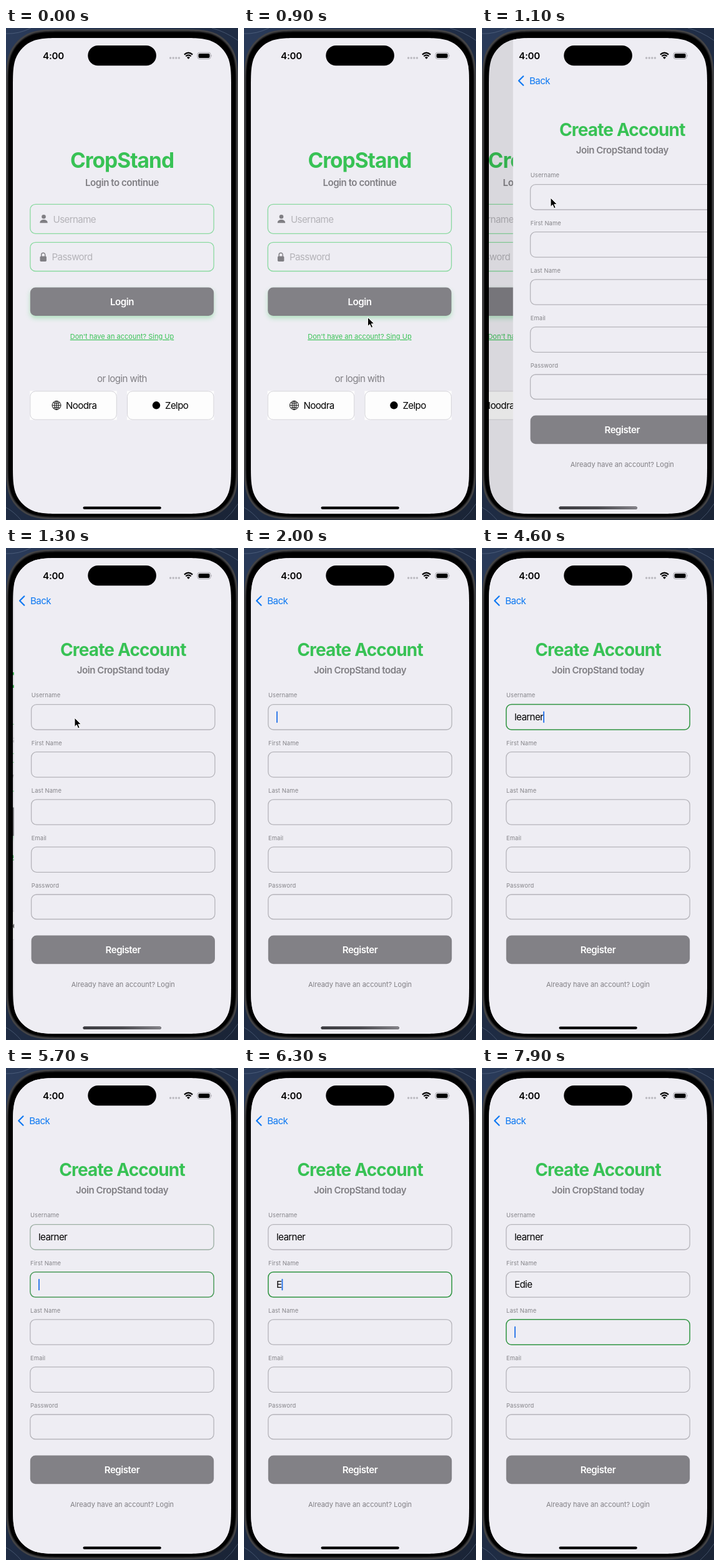
Recreate the animation shown at these times as an HTML page. Size 372x788 px, loop 8000 ms.

```html
<!DOCTYPE html>
<html lang="en">
<head>
<meta charset="utf-8">
<title>Sign up flow</title>
<style>
  html, body { margin: 0; width: 100%; height: 100%; overflow: hidden; background: #1b263a; }
  svg { display: block; width: 372px; height: 788px; }
  text {
    font-family: Inter, "Liberation Sans", sans-serif;
    font-optical-sizing: none;
    font-size: 15.1px;
    letter-spacing: -.04em;
    white-space: pre;
  }
  .mid { text-anchor: middle; }
  .title { font-weight: 700; font-size: 28px; letter-spacing: -.03em; fill: #38c255; }
  .brand { font-size: 33.5px; }
  .semi { font-weight: 600; letter-spacing: -.032em; }
  .small { font-size: 11px; letter-spacing: 0; }
  .label { font-size: 9.4px; letter-spacing: .012em; fill: #858489; }
  .grey { fill: #807f84; }
  .hint { fill: #b4b3b8; }
  .green { fill: #38c255; }
  .blue { fill: #0d78f2; }
  .white { fill: #fff; }
  .link { text-decoration: underline; }
  .page { fill: #eeedf3; }
  .button { fill: #828186; }
  .box { fill: none; stroke: #8ad9a0; stroke-width: 1.3; }
</style>
</head>
<body>
<svg viewBox="0 0 372 788" xmlns="http://www.w3.org/2000/svg">
  <defs>
    <linearGradient id="wall" x1="0" y1="0" x2="1" y2="1">
      <stop offset="0" stop-color="#2a3b5a"/>
      <stop offset=".5" stop-color="#1f2c44"/>
      <stop offset="1" stop-color="#1a2436"/>
    </linearGradient>
    <linearGradient id="bar">
      <stop offset="0" stop-color="#3c3c41"/>
      <stop offset=".5" stop-color="#4a4a4f"/>
      <stop offset="1" stop-color="#85848a"/>
    </linearGradient>
    <clipPath id="screen"><path id="glass"/></clipPath>
    <filter id="glow" x="-10%" y="-50%" width="120%" height="220%">
      <feDropShadow dx="0" dy="4" stdDeviation="3.5" flood-color="#34c759" flood-opacity=".32"/>
    </filter>
  </defs>

  <rect width="372" height="788" fill="url(#wall)"/>
  <g fill="none" stroke="#6b7c98" stroke-opacity=".5">
    <path d="M0 9Q20 10 40 0M330 0Q352 6 372 20M0 768Q12 774 24 788M350 788Q362 778 372 762"/>
  </g>
  <path id="rim" fill="#434345"/>
  <path id="edge" fill="#1f1f21"/>
  <path id="bezel"/>

  <g clip-path="url(#screen)">
    <g id="login">
      <rect class="page" x="11" y="16" width="350" height="762"/>
      <text class="title brand mid" x="186" y="224">CropStand</text>
      <text class="semi grey mid" x="186" y="252.5">Login to continue</text>

      <rect class="box" x="38.8" y="282.3" width="294.4" height="47" rx="8.5"/>
      <g class="grey">
        <circle cx="60.5" cy="302.3" r="3.3"/>
        <path d="M54.3 312.3C54.3 308.5 57 307 60.5 307S66.7 308.5 66.7 312.3Z"/>
      </g>
      <text class="hint" x="75.5" y="311.5">Username</text>

      <rect class="box" x="38.8" y="343.3" width="294.4" height="46.2" rx="8.5"/>
      <rect class="grey" x="54.5" y="365.5" width="10.4" height="8.4" rx="1.6"/>
      <path d="M56.7 366V363.2A3 3 0 0 1 62.7 363.2V366" fill="none" stroke="#807f84" stroke-width="1.4"/>
      <text class="hint" x="73.5" y="372">Password</text>

      <rect class="button" x="38.8" y="415.5" width="294.4" height="45.5" rx="8.5" filter="url(#glow)"/>
      <text class="semi white mid" x="186" y="444">Login</text>
      <text class="small green link mid" x="186" y="498">Don't have an account? Sing Up</text>
      <text class="grey mid" x="186" y="567">or login with</text>

      <g fill="#fdfdfd">
        <rect x="38.3" y="581.3" width="139.4" height="46.4"/>
        <rect x="194" y="581.3" width="139.4" height="46.4"/>
      </g>
      <g fill="none" stroke="#d3d2d8">
        <rect x="38.8" y="581.8" width="138.5" height="45.4" rx="8.5"/>
        <rect x="194.5" y="581.8" width="138.5" height="45.4" rx="8.5"/>
      </g>
      <g fill="none" stroke="#111" stroke-width="1">
        <circle cx="81" cy="604.3" r="7"/>
        <ellipse cx="81" cy="604.3" rx="3.3" ry="7"/>
        <path d="M74 604.3H88M81 597.3V611.3M75.6 600.2Q81 602.4 86.4 600.2M75.6 608.4Q81 606.2 86.4 608.4"/>
      </g>
      <text x="96" y="609.7">Noodra</text>
      <circle cx="241" cy="604.3" r="6.2"/>
      <text x="255" y="609.7">Zelpo</text>
      <rect id="dim" x="11" y="16" width="350" height="762"/>
    </g>

    <g id="signup">
      <rect class="page" x="11" y="16" width="350" height="762"/>
      <path d="M27.5 77.3L20.2 84.5L27.5 91.7" fill="none" stroke="#0d78f2" stroke-width="2.2" stroke-linecap="round" stroke-linejoin="round"/>
      <text class="blue" x="37.3" y="90">Back</text>
      <text class="title mid" x="186" y="172.5">Create Account</text>
      <text class="semi grey mid" x="186" y="200.5">Join CropStand today</text>
      <g id="form"></g>
      <rect id="caret" width="1.8" height="18.5" rx=".8" fill="#1f6fe8"/>
      <rect class="button" x="38.8" y="620.5" width="294.4" height="45.7" rx="8.5"/>
      <text class="semi white mid" x="186" y="649">Register</text>
      <text class="small grey mid" x="186" y="703">Already have an account? Login</text>
    </g>

    <text class="semi" x="59" y="50" style="letter-spacing:-.01em">4:00</text>
    <g fill="#b9b8be">
      <circle cx="263.6" cy="48" r="1.7"/><circle cx="268.2" cy="48" r="1.7"/>
      <circle cx="272.8" cy="48" r="1.7"/><circle cx="277.4" cy="48" r="1.7"/>
    </g>
    <g fill="none" stroke="#000" stroke-width="2.1">
      <path d="M285.9 42.6Q292.5 36.6 299.1 42.6M288.3 45.2Q292.5 41.5 296.7 45.2"/>
    </g>
    <path d="M290 47.2Q292.5 45 295 47.2L292.5 49.8Z"/>
    <rect x="307" y="39.3" width="21.2" height="10.2" rx="3.2" fill="none" stroke="#a3a2a8"/>
    <rect x="308.6" y="40.9" width="18" height="7" rx="1.9"/>
    <path d="M329.4 42.8Q331 44.4 329.4 46Z" fill="#a3a2a8"/>
  </g>

  <rect x="131.3" y="28" width="109.6" height="32.3" rx="16.1"/>
  <rect x="123.5" y="766.4" width="125.3" height="4.4" rx="2.2"/>
  <rect id="shine" x="123.5" y="766.4" width="125.3" height="4.4" rx="2.2" fill="url(#bar)"/>
  <path id="pointer" d="M0 0V14.4L3.3 11.3L5.6 16.8L8.1 15.7L5.8 10.4H10.4Z" stroke="#fff" stroke-width="1"/>
</svg>

<script>
const LOOP = 8000;
const PUSH = 895;
const WIDTH = 350;
const ROW = 76.1;
const IDLE = [181, 180, 186];
const ACTIVE = [47, 148, 64];

const labels = ["Username", "First Name", "Last Name", "Email", "Password"];
const values = ["learner", "Edie", "", "", ""];

// [time, field, characters typed]
const keys = [
  [1960, 0, 0], [2700, 0, 1], [2950, 0, 2], [3200, 0, 3], [3500, 0, 4],
  [3750, 0, 5], [4000, 0, 6], [4250, 0, 7],
  [5500, 1, 0], [6150, 1, 1], [6500, 1, 2], [6750, 1, 3], [7000, 1, 4],
  [7650, 2, 0]
];

// [time, x, y]
const trail = [[300, 225, 520], [600, 214, 497], [840, 214, 497], [1090, 110, 272], [1900, 110, 272]];

const $ = id => document.getElementById(id);
const clamp = v => Math.min(1, Math.max(0, v));
const ease = p => p * p * (3 - 2 * p);
const mix = (a, b, p) => a + (b - a) * p;

// Rounded box whose corners flow smoothly into the straight sides
function smoothBox(id, x, y, w, h, r) {
  const bend = [[0, 1.529], [0, 1.088], [0, .868], [.075, .631], [.169, .373], [.373, .169], [.631, .075], [.868, 0], [1.088, 0], [1.529, 0]];
  const corner = (right, bottom) => {
    const points = bend.map(([a, b]) => [
      right ? x + w - a * r : x + a * r,
      bottom ? y + h - b * r : y + b * r
    ]);
    if (right !== bottom) points.reverse();
    const [first, ...rest] = points;
    return `${first}C${rest}`;
  };
  $(id).setAttribute("d", `M${corner(false, false)}L${corner(true, false)}L${corner(true, true)}L${corner(false, true)}Z`);
}

function add(tag, attrs, text = "") {
  const el = document.createElementNS("http://www.w3.org/2000/svg", tag);
  for (const name in attrs) el.setAttribute(name, attrs[name]);
  el.textContent = text;
  return $("form").appendChild(el);
}

smoothBox("rim", 0, 2, 372, 785, 64);
smoothBox("edge", 2.5, 4.5, 367, 780, 62);
smoothBox("bezel", 4, 6.5, 364, 776, 60);
smoothBox("glass", 11, 16, 350, 762, 54);

const fields = labels.map((label, i) => {
  const y = 250.6 + i * ROW;
  add("text", { class: "label", x: 39, y: y - 11.2 }, label);
  return {
    y,
    box: add("rect", { x: 38.8, y, width: 294.4, height: i < 4 ? 40.4 : 39.5, rx: 8.5, fill: "none" }),
    text: add("text", { x: 52, y: y + 25.6 })
  };
});

function slide(t) {
  const s = Math.max(0, t - PUSH) * 0.01826;
  const p = s > 11 ? 1 : 1 - (1 + s) * Math.exp(-s);
  $("signup").setAttribute("transform", `translate(${WIDTH * (1 - p)} 0)`);
  $("login").setAttribute("transform", `translate(${-0.3 * WIDTH * p} 0)`);
  $("dim").setAttribute("opacity", 0.1 * p);
  $("shine").setAttribute("opacity", clamp((t - 900) / 150) * clamp((2900 - t) / 400));
}

function type(t) {
  const typed = [0, 0, 0, 0, 0];
  const focus = [];
  let last = null;
  for (const key of keys) {
    if (key[0] > t) break;
    const [time, field, count] = key;
    if (!count) focus.push({ field, time });
    typed[field] = count;
    last = key;
  }
  const now = focus[focus.length - 1];
  const before = focus[focus.length - 2];

  fields.forEach((f, i) => {
    let p = 0;
    if (now) {
      const turn = clamp((t - now.time - 40) / 200);
      if (now.field === i) p = turn;
      else if (before && before.field === i) p = 1 - turn;
    }
    f.box.setAttribute("stroke", `rgb(${IDLE.map((c, k) => mix(c, ACTIVE[k], p))})`);
    f.box.setAttribute("stroke-width", mix(1.3, 1.5, p));
    const value = values[i].slice(0, typed[i]);
    if (f.text.textContent !== value) f.text.textContent = value;
  });

  const caret = $("caret");
  const shown = last && (t - last[0]) % 1000 < 550;
  caret.setAttribute("opacity", shown ? 1 : 0);
  if (last) {
    const f = fields[last[1]];
    caret.setAttribute("x", 52 + (last[2] ? f.text.getComputedTextLength() : 0));
    caret.setAttribute("y", f.y + 11);
  }
}

function point(t) {
  const next = trail.findIndex(step => step[0] > t);
  $("pointer").setAttribute("opacity", next > 0 ? 1 : 0);
  if (next < 1) return;
  const [t0, x0, y0] = trail[next - 1];
  const [t1, x1, y1] = trail[next];
  const p = ease((t - t0) / (t1 - t0));
  $("pointer").setAttribute("transform", `translate(${mix(x0, x1, p)} ${mix(y0, y1, p)})`);
}

function draw(t) {
  slide(t);
  type(t);
  point(t);
}

const start = performance.now();
function tick() {
  draw((performance.now() - start) % LOOP);
  requestAnimationFrame(tick);
}
tick();
</script>
</body>
</html>
```
